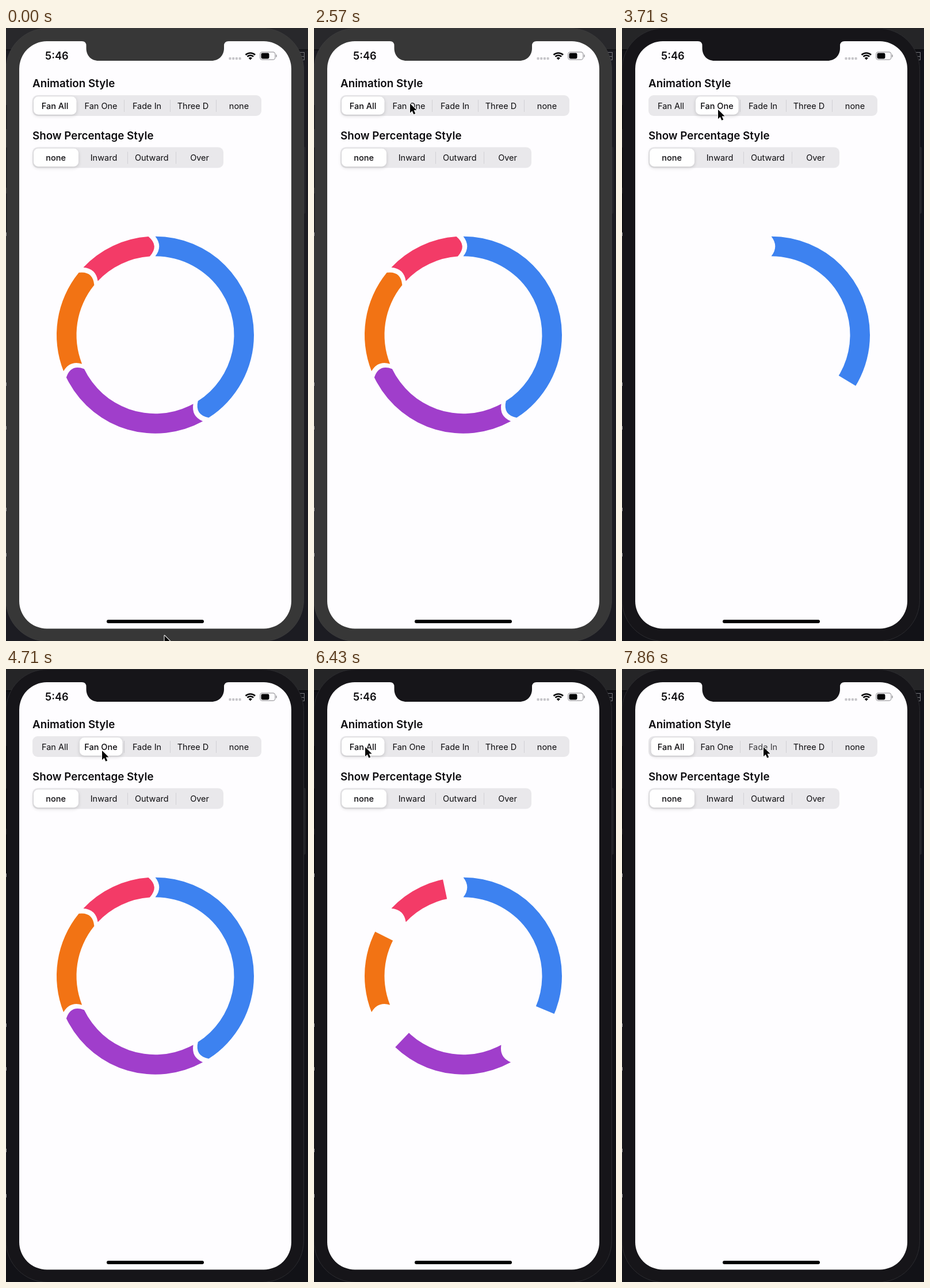
These frames come from a looping animation (525 px wide and 1067 px high, 8 s). An HTML page with a canvas:

```html
<!DOCTYPE html>
<html lang="en">
<head>
<meta charset="utf-8">
<title>Donut chart demo</title>
<style>
html, body { margin: 0; width: 525px; height: 1067px; overflow: hidden; background: #1b1b20; }
canvas { display: block; width: 525px; height: 1067px; }
</style>
</head>
<body>
<canvas id="stage"></canvas>
<script>
const W = 525, H = 1067, LOOP = 8000, FPS = 7;
const FONT = 'Inter, Roboto, "Liberation Sans", sans-serif';
const canvas = document.getElementById('stage');
const ctx = canvas.getContext('2d');
const dpr = window.devicePixelRatio || 1;
canvas.width = W * dpr;
canvas.height = H * dpr;

const FOCUS = 3000, FAN_ONE = 3110, FAN_ALL = 5453, FADE_IN = 7830;
const GROW = 1500, SLIDE = 300;

const chart = { x: 259.5, y: 534.2, outer: 171.5, inner: 137, gap: 4 };
const slices = [
  { share: 0.42, color: '#3d82f0' },
  { share: 0.27, color: '#a03ecb' },
  { share: 0.18, color: '#f27314' },
  { share: 0.13, color: '#f33b67' }
];

const clamp = v => Math.max(0, Math.min(1, v));
const mix = (a, b, p) => a + (b - a) * p;

// cubic-bezier(.42, 0, .58, 1)
function easeInOut(x) {
  if (x <= 0) return 0;
  if (x >= 1) return 1;
  let lo = 0, hi = 1, u = 0.5;
  for (let i = 0; i < 24; i++) {
    u = (lo + hi) / 2;
    const v = 1 - u;
    const bx = 3 * u * v * v * 0.42 + 3 * u * u * v * 0.58 + u * u * u;
    if (bx < x) lo = u; else hi = u;
  }
  return u * u * (3 - 2 * u);
}

function box(x, y, w, h, r, color) {
  ctx.beginPath();
  ctx.roundRect(x, y, w, h, r);
  ctx.fillStyle = color;
  ctx.fill();
}

function label(str, x, y, size, weight, align = 'left', color = '#0c0b0e') {
  ctx.font = `${weight} ${size}px ${FONT}`;
  ctx.textAlign = align;
  ctx.fillStyle = color;
  ctx.fillText(str, x, y);
}

function drawDesktop(active) {
  ctx.fillStyle = active ? '#121217' : '#1c1c22';
  ctx.fillRect(0, 0, W, H);
  ctx.fillStyle = active ? '#252527' : '#28282b';
  ctx.fillRect(0, 0, W, 38);
  ctx.fillStyle = active ? '#0b0b0e' : '#131317';
  ctx.fillRect(0, 37, W, 2);
  ctx.strokeStyle = '#77777b';
  ctx.lineWidth = 1;
  ctx.strokeRect(508.5, 42.5, 10, 13);
  ctx.beginPath();
  ctx.moveTo(519, 49.5);
  ctx.lineTo(513, 49.5);
  ctx.stroke();
}

function drawPhone(active) {
  const body = active ? '#161519' : '#373737';
  box(515, 207, 6, 116, 2, active ? '#222226' : '#25252a');
  box(0, 0.5, 517.5, 1067, 72, body);
  ctx.strokeStyle = active ? '#2c2c30' : '#3d3d3e';
  ctx.lineWidth = 1;
  ctx.stroke();
  for (const [y, h] of [[134, 42], [208, 70], [288, 67]]) {
    ctx.fillStyle = active ? '#0c0c0f' : '#202024';
    ctx.fillRect(0, y, 1.5, h);
  }
  ctx.fillStyle = '#9a9a9d';
  for (const y of [356, 617, 693, 835, 914]) ctx.fillRect(0, y, 1, 6);

  box(23, 23, 473, 1022.5, 48, '#fefdff');

  ctx.fillStyle = body;
  ctx.beginPath();
  ctx.moveTo(132, 22);
  ctx.lineTo(132, 23);
  ctx.quadraticCurveTo(139.5, 23, 139.5, 31);
  ctx.lineTo(139.5, 35);
  ctx.bezierCurveTo(139.5, 48, 148, 57, 161, 57);
  ctx.lineTo(357, 57);
  ctx.bezierCurveTo(370, 57, 379, 48, 379, 35);
  ctx.lineTo(379, 31);
  ctx.quadraticCurveTo(379, 23, 387, 23);
  ctx.lineTo(387, 22);
  ctx.fill();

  box(175, 1030, 169, 6, 3, '#000');
}

function drawStatus() {
  label('5:46', 68, 55, 18.2, 600);
  for (let i = 0; i < 4; i++) box(387.5 + i * 5.7, 51, 4, 4.2, 1.2, '#c6c5c9');

  // wifi
  const cx = 424.8, cy = 55.5, half = 0.76;
  ctx.strokeStyle = '#050507';
  ctx.lineWidth = 2.7;
  for (const r of [12, 7.8]) {
    ctx.beginPath();
    ctx.arc(cx, cy, r, -Math.PI / 2 - half, -Math.PI / 2 + half);
    ctx.stroke();
  }
  ctx.beginPath();
  ctx.moveTo(cx, cy);
  ctx.arc(cx, cy, 4.6, -Math.PI / 2 - half, -Math.PI / 2 + half);
  ctx.fillStyle = '#050507';
  ctx.fill();

  // battery
  ctx.beginPath();
  ctx.roundRect(441.7, 41.8, 26.2, 13.4, 4);
  ctx.strokeStyle = '#9c9b9f';
  ctx.lineWidth = 1.2;
  ctx.stroke();
  box(443.5, 43.6, 14, 9.8, 2.4, '#050507');
  box(469.2, 46.3, 1.6, 4.6, 0.8, '#9c9b9f');
}

function drawPicker({ y, w, h, names, first, step, pos, pillW, dividers, dim }) {
  box(46, y, w, h, 9, '#e9e8eb');
  ctx.fillStyle = '#d2d1d5';
  dividers.forEach((x, i) => {
    const near = pos > i + 0.25 && pos < i + 1.75;
    if (i > 0 && !near) ctx.fillRect(x, y + 8, 1, 21);
  });
  ctx.save();
  ctx.shadowColor = 'rgba(0,0,0,.17)';
  ctx.shadowBlur = 6 * dpr;
  ctx.shadowOffsetY = 2 * dpr;
  box(48 + pos * step, y + 2.3, pillW, h - 4.6, 8, '#fff');
  ctx.restore();
  names.forEach((name, i) => {
    const on = Math.round(pos) === i;
    label(name, first + i * step, y + 23.6, 14.5, on ? 500 : 400, 'center',
      dim === i ? '#3c3b3f' : '#0c0b0e');
  });
}

function selection(t) {
  const go = start => easeInOut((t - start) / SLIDE);
  if (t < FAN_ALL) return go(FAN_ONE);
  if (t < FADE_IN) return 1 - go(FAN_ALL);
  return 2 * go(FADE_IN);
}

function drawPickers(t) {
  label('Animation Style', 46, 103, 18.8, 600);
  drawPicker({
    y: 117, w: 398, h: 36, step: 80, first: 85, pillW: 74.5, pos: selection(t),
    names: ['Fan All', 'Fan One', 'Fade In', 'Three D', 'none'],
    dividers: [125, 205, 285, 365], dim: t >= FADE_IN ? 2 : -1
  });
  label('Show Percentage Style', 46, 193.5, 18.8, 600);
  drawPicker({
    y: 207.5, w: 332, h: 36, step: 83.3, first: 86.7, pillW: 78, pos: 0,
    names: ['none', 'Inward', 'Outward', 'Over'],
    dividers: [128, 211, 295], dim: -1
  });
}

const rad = deg => (deg - 90) * Math.PI / 180;

// Edge across the ring, bowed clockwise by `bulge` pixels.
function edge(angle, toRadius, bulge) {
  const { x, y, outer, inner } = chart;
  const c = Math.cos(angle), s = Math.sin(angle), mid = (outer + inner) / 2;
  ctx.quadraticCurveTo(
    x + mid * c - 2 * bulge * s, y + mid * s + 2 * bulge * c,
    x + toRadius * c, y + toRadius * s);
}

function drawSlice(from, to, grown, color) {
  if (grown <= 0) return;
  const { x, y, outer, inner, gap } = chart;
  const a0 = rad(from), a1 = rad(to - gap);
  ctx.save();
  if (grown < 1) {
    ctx.beginPath();
    ctx.moveTo(x, y);
    ctx.arc(x, y, outer + 20, a0, rad(mix(from, to, grown)));
    ctx.closePath();
    ctx.clip();
  }
  ctx.beginPath();
  ctx.arc(x, y, outer, a0, a1);
  edge(a1, inner, 9);
  ctx.arc(x, y, inner, a1, a0, true);
  edge(a0, outer, 6.8);
  ctx.fillStyle = color;
  ctx.fill();
  ctx.restore();
}

function drawChart(t) {
  if (t >= FADE_IN) return;
  const oneByOne = t >= FAN_ONE && t < FAN_ALL;
  const start = t < FAN_ONE ? -GROW : oneByOne ? FAN_ONE : FAN_ALL;
  const p = easeInOut((t - start) / GROW);
  let sum = 0;
  for (const { share, color } of slices) {
    const grown = oneByOne ? clamp((p - sum) / share) : p;
    drawSlice(sum * 360, (sum + share) * 360, grown, color);
    sum += share;
  }
}

// [time, x, y] of the pointer tip
const stops = [
  [1430, 222, 155], [1570, 164.5, 128], [2290, 165, 130], [2570, 167, 131.5],
  [3000, 167, 131.5], [3430, 167, 142], [4860, 167, 142], [5430, 89, 136],
  [6570, 89, 136], [7140, 146, 127.5], [7710, 246, 136], [8000, 246, 136]
];

function pointer(t) {
  if (t < 140) return [275.5, 1057.5];
  if (t < 425) return null;
  if (t < 1430) {
    const p = clamp((t - 430) / 1000), u = 1 - (1 - p) ** 1.4, v = 1 - u;
    return [
      v * v * 300 + 2 * u * v * 490 + u * u * 222,
      v * v * 957 + 2 * u * v * 520 + u * u * 155
    ];
  }
  const i = stops.findIndex(s => s[0] > t);
  const [t0, x0, y0] = stops[i - 1], [t1, x1, y1] = stops[i];
  const p = easeInOut((t - t0) / (t1 - t0));
  return [mix(x0, x1, p), mix(y0, y1, p)];
}

const arrow = new Path2D('M0 0V16.2L3.7 12.7L6.3 18.8L9.2 17.6L6.6 11.6H11.6Z');

function drawPointer(t) {
  const at = pointer(t);
  if (!at) return;
  ctx.save();
  ctx.translate(at[0], at[1]);
  ctx.lineJoin = 'round';
  ctx.strokeStyle = '#fff';
  ctx.lineWidth = 2;
  ctx.stroke(arrow);
  ctx.fillStyle = '#050505';
  ctx.fill(arrow);
  ctx.restore();
}

function draw(now) {
  const tick = Math.floor((now % LOOP + 5) * FPS / 1000) % (LOOP * FPS / 1000);
  const t = tick * 1000 / FPS;
  const active = t >= FOCUS;
  ctx.setTransform(dpr, 0, 0, dpr, 0, 0);
  drawDesktop(active);
  drawPhone(active);
  drawStatus();
  drawPickers(t);
  drawChart(t);
  drawPointer(t);
}

let begin = null;
function loop(now) {
  if (begin === null) begin = now;
  draw(now - begin);
  requestAnimationFrame(loop);
}
draw(0);
requestAnimationFrame(loop);
</script>
</body>
</html>
```
